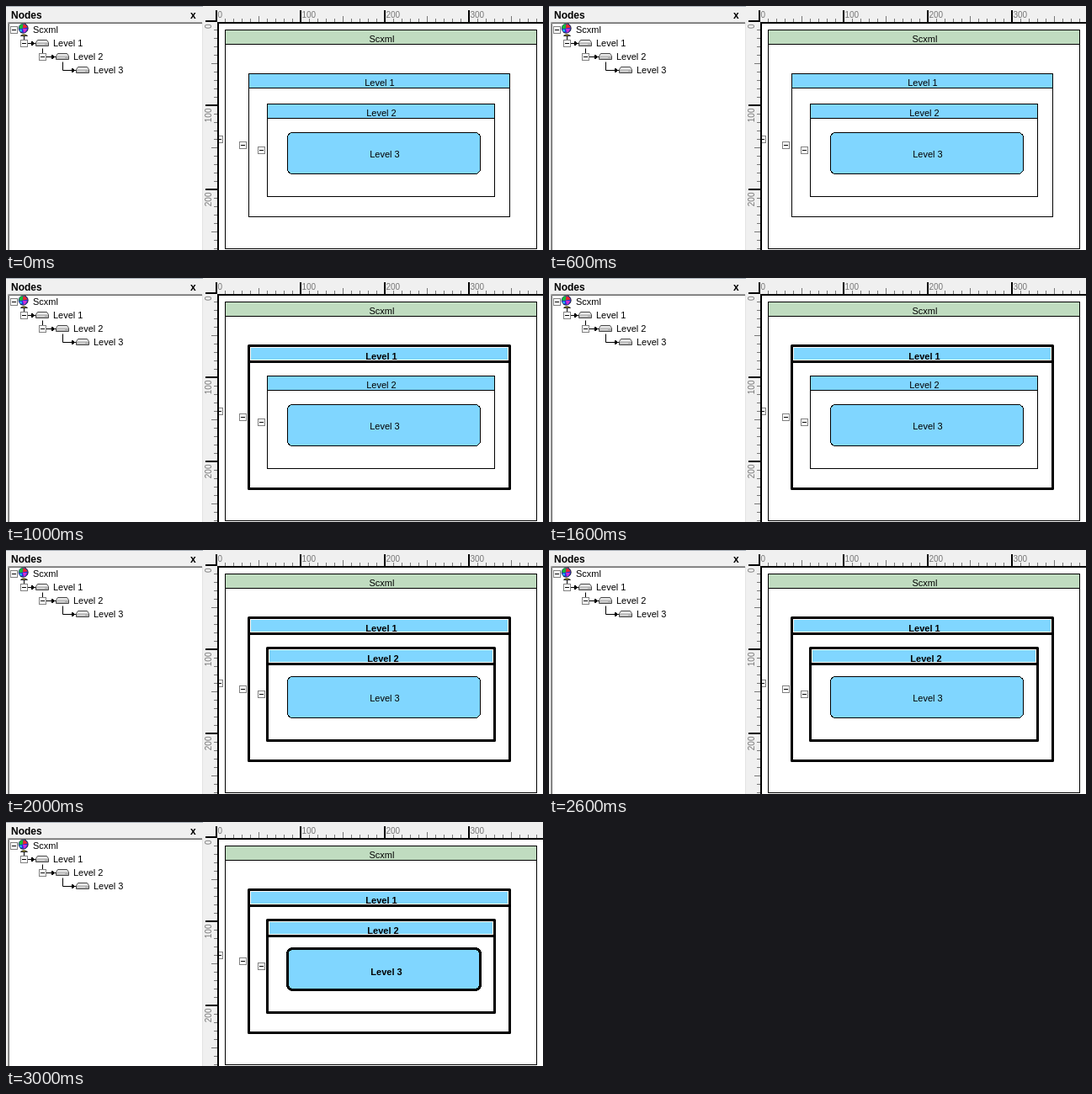
These frames come from a looping animation (638 by 290 pixels, 4000 ms). An HTML page:

```html
<!DOCTYPE html>
<html lang="en">
<head>
<meta charset="utf-8">
<title>Nested states</title>
<style>
  html, body { margin: 0; width: 100%; height: 100%; overflow: hidden; background: #fff; }
  svg { display: block; width: 638px; height: 290px; }
  text { font: 11px "Liberation Sans", Arial, sans-serif; fill: #000; }
  .strong { font-weight: bold; }
  .mid { text-anchor: middle; }
  .title { font-size: 12px; font-weight: bold; }
  .rule { font-size: 10px; fill: #777; }
</style>
</head>
<body>
<svg id="stage" viewBox="0 0 638 290"></svg>
<script>
const stage = document.getElementById('stage');
const BLUE = '#80d6ff', GREEN = '#c0dcc0', FACE = '#f0f0f0';
const STEP = 1000, STEPS = 4;
const CRISP = { 'shape-rendering': 'crispEdges' };

function add(parent, tag, attrs, content) {
  const el = document.createElementNS('http://www.w3.org/2000/svg', tag);
  for (const key in attrs) el.setAttribute(key, attrs[key]);
  if (content) el.textContent = content;
  parent.appendChild(el);
  return el;
}
const rect = (p, x, y, width, height, fill, more) =>
  add(p, 'rect', { x, y, width, height, fill, ...more });
const path = (p, d, stroke = '#000', fill = 'none', more) =>
  add(p, 'path', { d, stroke, fill, ...more });
const label = (p, x, y, str, cls = '', more) =>
  add(p, 'text', { x, y, class: cls, ...more }, str);

function toggle(p, x, y) {
  rect(p, x + .5, y + .5, 8, 8, '#fff', { stroke: '#808080' });
  path(p, `M${x + 2} ${y + 4.5}h5`);
}

function rulers() {
  rect(stage, 234, 0, 404, 19, FACE);
  rect(stage, 234, 0, 17, 290, FACE);
  for (let n = 0; n <= 380; n += 10) {
    const major = n % 100 === 0;
    const size = major ? 14 : n % 50 === 0 ? 7 : 4;
    const tone = major ? '#000' : '#777';
    const pen = { 'stroke-width': major ? 2 : 1 };
    const mid = major ? 0 : .5;
    path(stage, `M${250 + mid + n} 19v${-size}`, tone, 'none', pen);
    if (n <= 270) path(stage, `M251 ${18 + mid + n}h${-size}`, tone, 'none', pen);
    if (!major) continue;
    label(stage, 251.5 + n, 14, String(n), 'rule');
    if (n <= 200) label(stage, 0, 0, String(n), 'rule',
      { transform: `translate(244 ${21.5 + n}) rotate(-90)`, 'text-anchor': 'end' });
  }
  path(stage, 'M252 290V20H638', '#000', 'none', { 'stroke-width': 2 });
}

function globe() {
  path(stage, 'M22 20.5Q27.5 24 25.5 29Q23 33 17 31.5', '#222');
  path(stage, 'M17.5 35.5Q21 32 25.5 35.5Z', '#222', '#e8d020');
  add(stage, 'circle', { cx: 20.5, cy: 26.5, r: 5.5, fill: '#2030e0', stroke: '#222', 'stroke-width': .6 });
  path(stage, 'M16 23.5Q18 21 20.5 21.5L19.5 27L15.5 27Z', 'none', '#18b838');
  path(stage, 'M20.5 21.5Q24 22 25.5 25.5L20 26.5Z', 'none', '#f02828');
  path(stage, 'M20 27H25Q24 31 21 31.5Z', 'none', '#d030d0');
  path(stage, 'M16 28H19L18.5 31Q16.5 30.5 16 28Z', 'none', '#20c8e8');
}

function drive(x, y) {
  path(stage, `M${x + 2.5} ${y + .5}h11l2 3v4h-15v-4z`, '#484848', '#b4b4b4', { 'stroke-linejoin': 'round' });
  path(stage, `M${x + 3} ${y + 1}h10l2 2.5h-14z`, 'none', '#e8e8e8');
  path(stage, `M${x + 2} ${y + 5.5}h9`, '#dcdcdc');
}

function tree() {
  rect(stage, 0, 0, 234, 290, FACE);
  rect(stage, 0, 0, 234, 1, '#a8b0b8');
  rect(stage, 3, 20, 230, 270, '#fff');
  path(stage, 'M2.5 290V19.5H233', '#a0a0a0');
  path(stage, 'M3.5 290V20.5H233', '#696969');
  path(stage, 'M233.5 20V290', '#e3e3e3');
  label(stage, 6, 15, 'Nodes', 'title');
  label(stage, 219, 15, 'x', 'title');
  for (let i = 0; i < 3; i++) {
    const x = 21.5 + (i === 2 ? 46 : i * 22), y = 44.5 + i * 16;
    const end = 34 + i * 24;
    path(stage, `M${x} ${y - 10}V${y}H${end}`);
    path(stage, `M${end - 4} ${y - 3}l4.5 3l-4.5 3z`, 'none', '#000', CRISP);
    if (i < 2) toggle(stage, x - 4.5, y - 4.5);
    drive(35 + i * 24, 40 + i * 16);
    label(stage, 56 + i * 24, 48 + i * 16, `Level ${i + 1}`);
  }
  globe();
  label(stage, 32, 32, 'Scxml');
  toggle(stage, 5, 24);
}

function frameBox(p, x, y, w, h, fill, name, cx, bold) {
  const width = { 'stroke-width': bold ? 3 : 1 };
  const head = bold ? 19 : 17;
  rect(p, x, y, w, h, '#fff', { stroke: '#000', 'stroke-linejoin': bold ? 'round' : 'miter', ...width });
  if (bold) rect(p, x + 2.5, y + 2.5, w - 5, 14, fill);
  else rect(p, x + .5, y + .5, w - 1, head - .5, fill);
  path(p, `M${x} ${y + head}h${w}`, '#000', 'none', width);
  label(p, cx, y + (bold ? 16.5 : 14.5), name, bold ? 'mid strong' : 'mid');
}

function leaf(p, x, y, w, h, name, cx, bold) {
  rect(p, x, y, w, h, BLUE, { rx: 6, stroke: '#000', 'stroke-width': bold ? 3 : 1, ...CRISP });
  label(p, cx, y + (bold ? 31.5 : 29.5), name, bold ? 'mid strong' : 'mid');
}

// Each level has a thin and a bold look
const levels = [];
function level(draw) {
  levels.push([false, true].map(bold => {
    const g = add(stage, 'g', {});
    draw(g, bold);
    return g;
  }));
}

rect(stage, 250, 18, 388, 272, '#fff');
toggle(stage, 249, 154);
rulers();
tree();
frameBox(stage, 260.5, 28.5, 370, 260, GREEN, 'Scxml', 446.5, false);
level((g, b) => frameBox(g, 288.5, 80.5, 310, 170, BLUE, 'Level 1', b ? 446 : 444, b));
level((g, b) => frameBox(g, 310.5, 116.5, 270, 110, BLUE, 'Level 2', b ? 448 : 446, b));
level((g, b) => leaf(g, 334.5, 150.5, 229, 49, 'Level 3', b ? 452 : 450, b));
toggle(stage, 277, 161);
toggle(stage, 299, 167);

function render(now) {
  const step = Math.floor(now / STEP) % STEPS;
  levels.forEach(([thin, bold], i) => {
    const on = step > i;
    thin.style.display = on ? 'none' : '';
    bold.style.display = on ? '' : 'none';
  });
}

const start = performance.now();
function tick() {
  render(performance.now() - start);
  requestAnimationFrame(tick);
}
tick();
</script>
</body>
</html>
```
